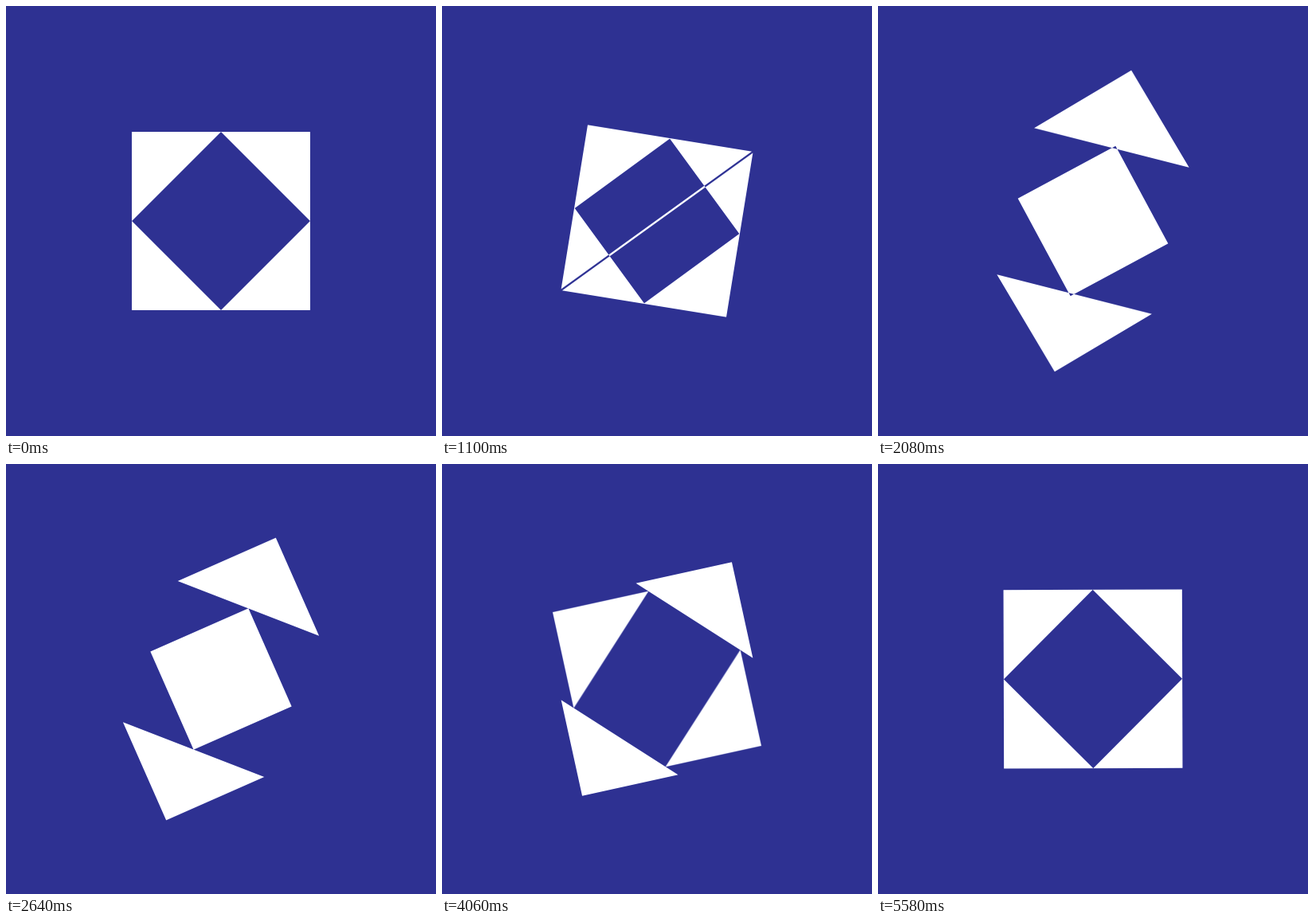
Animation of 540x540 px, one loop 5.6 s. Source, as an HTML page with a canvas:

```html
<!DOCTYPE html>
<html lang="en">
<head>
<meta charset="utf-8">
<title>Folding squares</title>
<style>
  html, body { margin: 0; width: 100%; height: 100%; overflow: hidden; background: #2e3192; }
  canvas { display: block; }
</style>
</head>
<body>
<canvas id="stage" width="540" height="540"></canvas>
<script>
const LOOP = 5600, STEP = 20, CENTER = 270, RADIUS = 112;
const SAMPLES = 6, SHUTTER = 12;
const BLUE = '#2e3192';
const LIGHT_SHARE = 'rgb(35,35,19)'; // six of these added to BLUE give white
const ctx = document.getElementById('stage').getContext('2d');

function ease(time, start, length, power) {
  const x = Math.min(1, Math.max(0, (time - start) / length));
  return x < 0.5 ? 0.5 * (2 * x) ** power : 1 - 0.5 * (2 - 2 * x) ** power;
}

function polygon(points) {
  points.forEach(([x, y], i) => i ? ctx.lineTo(x, y) : ctx.moveTo(x, y));
  ctx.closePath();
}

// Two halves of a square, pulled apart by `offset` along the direction `angle` (0 = up).
function splitSquare(angle, size, offset) {
  const sin = Math.sin(angle), cos = Math.cos(angle);
  const at = (across, along) => [
    CENTER + across * cos + along * sin,
    CENTER + across * sin - along * cos
  ];
  if (offset === 0) {
    polygon([at(-size, 0), at(0, size), at(size, 0), at(0, -size)]);
    return;
  }
  for (const side of [1, -1]) {
    polygon([
      at(-size, side * offset),
      at(0, side * (offset + size)),
      at(size, side * offset)
    ]);
  }
}

function drawShapes(time) {
  const turn = time / LOOP;
  const angle = turn * Math.PI / 4;
  const inner = RADIUS * 2 ** (-turn / 2);
  const unfold = ease(time, 907, 1540, 3);
  const spread = ease(time, 3149, 1530, 4);
  const outer = inner * 2 ** ((1 - unfold) / 2);

  ctx.beginPath();
  splitSquare(angle - (1 - unfold) * Math.PI / 4, outer, outer * unfold);
  splitSquare(angle - Math.PI / 2, inner, inner * spread);
  ctx.fill('evenodd');
}

function render(time) {
  ctx.globalCompositeOperation = 'source-over';
  ctx.fillStyle = BLUE;
  ctx.fillRect(0, 0, 540, 540);

  // Motion blur: add up several moments around the current time.
  ctx.globalCompositeOperation = 'lighter';
  ctx.fillStyle = LIGHT_SHARE;
  for (let i = 0; i < SAMPLES; i++) {
    drawShapes(time + SHUTTER * ((i + 0.5) / SAMPLES - 0.5));
  }
}

const start = performance.now();
function tick() {
  const time = (performance.now() - start) % LOOP;
  render(Math.floor(time / STEP) * STEP);
  requestAnimationFrame(tick);
}
tick();
</script>
</body>
</html>
```
